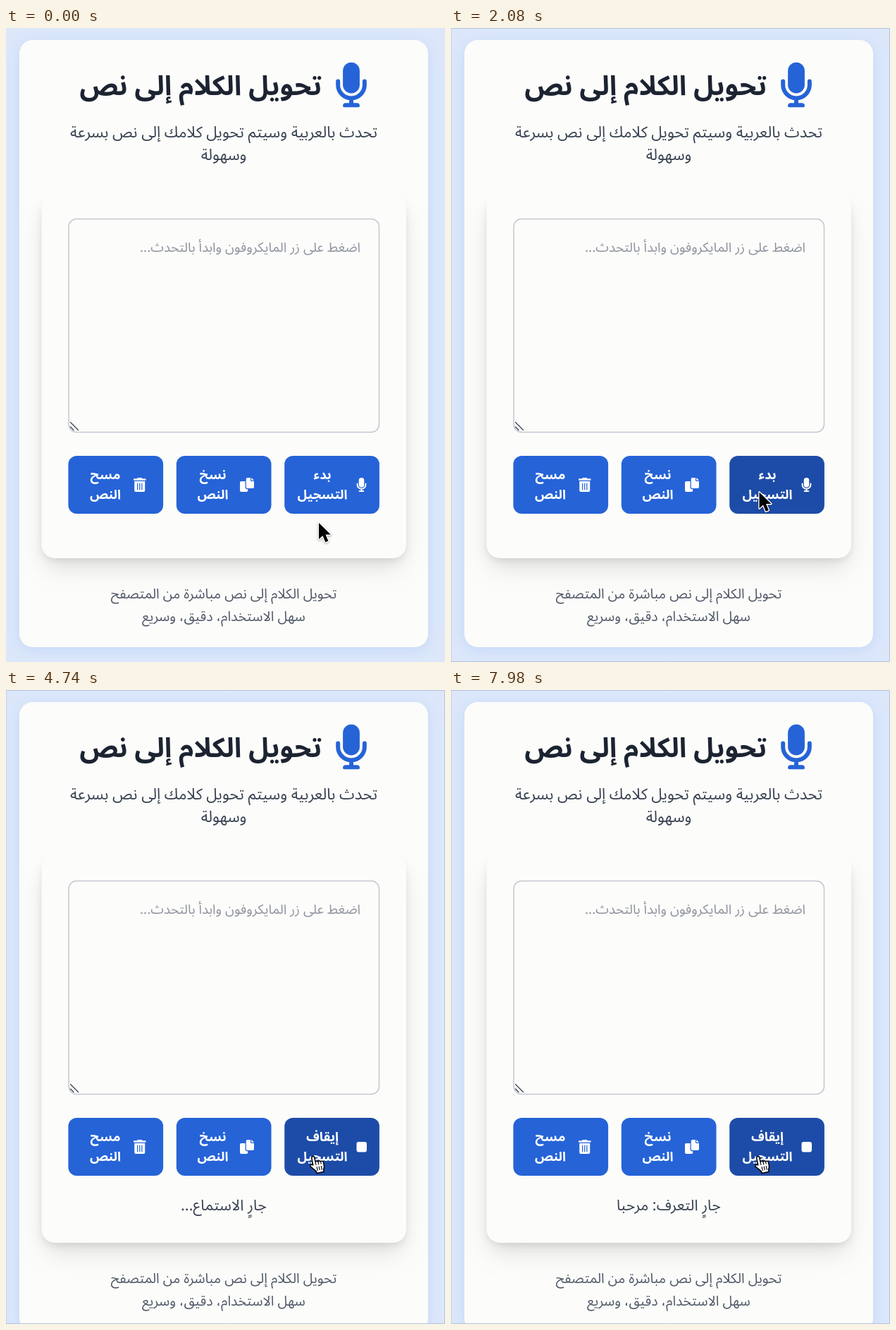
These frames come from a looping animation (623x898 px, 8 s). An HTML page with a canvas:

```html
<!DOCTYPE html>
<html lang="ar">
<head>
<meta charset="utf-8">
<title>تحويل الكلام إلى نص</title>
<style>
  html, body { margin: 0; width: 100%; height: 100%; overflow: hidden; background: #dce7fa; }
  canvas { display: block; }
</style>
</head>
<body>
<canvas id="stage" width="623" height="898"></canvas>
<script>
const W = 623, H = 898, LOOP = 8000;
const ctx = document.getElementById('stage').getContext('2d');

const PAGE = '#dce7fa', PAPER = '#fcfcfa';
const BLUE = [37, 99, 215], DARK_BLUE = [29, 76, 168];
const rgb = c => `rgb(${c.map(Math.round).join(',')})`;
const FAMILY = '"Noto Sans Arabic", "DejaVu Sans", sans-serif';
const TIMES = { edge: 40, moveStart: 120, moveEnd: 560, click: 2700, heard: 7450 };

const progress = (t, from, to) => Math.max(0, Math.min(1, (t - from) / (to - from)));
const ease = p => p * p * (3 - 2 * p);
const mix = (a, b, p) => a + (b - a) * p;

// The installed Arabic face decides the size; proportions are kept.
function style(weight, color, sample, span) {
  ctx.font = `${weight} 100px ${FAMILY}`;
  const size = Math.round(span / ctx.measureText(sample).width * 1000) / 10;
  return { font: `${weight} ${size}px ${FAMILY}`, color };
}

const LABEL = {
  title: 'تحويل الكلام إلى نص',
  intro: 'تحدث بالعربية وسيتم تحويل كلامك إلى نص بسرعة',
  hint: 'اضغط على زر المايكروفون وابدأ بالتحدث...',
  listening: 'جارٍ الاستماع...',
  footer: 'تحويل الكلام إلى نص مباشرة من المتصفح'
};

ctx.direction = 'rtl';
const STYLE = {
  title: style(700, '#1c2331', LABEL.title, 344),
  intro: style(500, '#374151', LABEL.intro, 437),
  hint: style(500, '#8e939e', LABEL.hint, 313),
  button: style(700, '#ffffff', 'التسجيل', 71),
  status: style(500, '#374151', LABEL.listening, 122),
  footer: style(500, '#505968', LABEL.footer, 320)
};

function text(str, x, y, { font, color }, align = 'center') {
  ctx.font = font;
  ctx.fillStyle = color;
  ctx.textAlign = align;
  ctx.fillText(str, x, y);
}

function box(x, y, w, h, r, fill) {
  ctx.beginPath();
  ctx.roundRect(x, y, w, h, r);
  ctx.fillStyle = fill;
  ctx.fill();
}

function shadowBox(x, y, w, h, r, color, blur, dy) {
  ctx.save();
  ctx.shadowColor = color;
  ctx.shadowBlur = blur;
  ctx.shadowOffsetY = dy;
  box(x, y, w, h, r, PAPER);
  ctx.restore();
}

function at(x, y, scale, draw) {
  ctx.save();
  ctx.translate(x, y);
  ctx.scale(scale, scale);
  draw();
  ctx.restore();
}

function stroke(path, color, width) {
  ctx.strokeStyle = color;
  ctx.lineWidth = width;
  ctx.lineCap = ctx.lineJoin = 'round';
  ctx.stroke(path);
}

const MIC_STAND = new Path2D('M40 216V256A152 152 0 0 0 344 256V216M192 408V480');
const COPY = new Path2D(
  'M384 96V0H272A48 48 0 0 0 224 48V336A48 48 0 0 0 272 384H464A48 48 0 0 0 512 336V128H416A32 32 0 0 1 384 96Z' +
  'M416 0V96H512Z' +
  'M192 352V128H48A48 48 0 0 0 0 176V464A48 48 0 0 0 48 512H240A48 48 0 0 0 288 464V416H256A64 64 0 0 1 192 352Z');
const TRASH_HANDLE = new Path2D('M128 32L140 9Q145 0 154 0H294Q303 0 308 9L320 32Z');
const SLITS = new Path2D('M144 208V432M224 208V432M304 208V432');
const ARROW = new Path2D('M0 0V17L4 13.3L6.8 20L9.8 18.7L7 12.2H12.4Z');
const HAND = new Path2D(
  'M6 14V3.5A2.2 2.2 0 0 1 10.4 3.5V10Q12.4 8.5 14.4 10.3Q16.4 9.1 18.2 10.8Q21.8 10.2 22 13.3' +
  'V18Q22 21 20 23.5V27H9V24.5Q7 21.5 2 15.5Q1.2 12.5 3.6 12.9Q5.1 13.2 6 14Z');
const KNUCKLES = new Path2D('M10.4 10V14.5M14.4 10.5V14.5M18.2 11V14.5M11 18V23M14.3 18V23M17.6 18V23');

function mic(x, y, scale, color) {
  at(x, y, scale, () => {
    box(96, 0, 192, 352, 96, color);
    stroke(MIC_STAND, color, 48);
    box(96, 464, 192, 48, [32, 32, 16, 16], color);
  });
}

function copyIcon(x, y) {
  at(x, y, 0.039, () => {
    ctx.fillStyle = '#fff';
    ctx.fill(COPY);
  });
}

function trashIcon(x, y) {
  at(x, y, 0.039, () => {
    ctx.fillStyle = '#fff';
    ctx.fill(TRASH_HANDLE);
    box(0, 32, 448, 64, 16, '#fff');
    box(32, 128, 384, 384, [0, 0, 48, 48], '#fff');
    stroke(SLITS, rgb(BLUE), 32);
  });
}

function arrow(x, y) {
  at(x, y, 1.36, () => {
    ctx.save();
    ctx.shadowColor = 'rgba(0,0,0,.35)';
    ctx.shadowBlur = 3;
    ctx.shadowOffsetY = 1;
    stroke(ARROW, '#fff', 2);
    ctx.restore();
    ctx.fillStyle = '#000';
    ctx.fill(ARROW);
  });
}

function hand(x, y) {
  at(x, y, 0.95, () => {
    ctx.rotate(-0.2);
    ctx.fillStyle = '#fff';
    ctx.fill(HAND);
    stroke(HAND, '#000', 1.6);
    stroke(KNUCKLES, '#000', 1.2);
  });
}

function textArea() {
  ctx.beginPath();
  ctx.roundRect(89, 270.5, 440.5, 302, 11);
  ctx.strokeStyle = '#c3c7d0';
  ctx.lineWidth = 1.5;
  ctx.stroke();
  stroke(new Path2D('M91.5 558.5L102.5 569.5M91.5 565L96 569.5'), '#343a48', 1.2);
  text(LABEL.hint, 503, 317, STYLE.hint, 'right');
}

function button(column, color, center, top, bottom) {
  box(88.4 + column * 153.4, 606, 134.7, 82, 12, rgb(color));
  text(top, center, 639, STYLE.button);
  text(bottom, center, 667, STYLE.button);
}

function buttons(hover, recording) {
  button(0, BLUE, 141, 'مسح', 'النص');
  trashIcon(181, 637);
  button(1, BLUE, 293.5, 'نسخ', 'النص');
  copyIcon(332, 637);
  const color = BLUE.map((c, i) => mix(c, DARK_BLUE[i], hover));
  button(2, color, 449, recording ? 'إيقاف' : 'بدء', 'التسجيل');
  if (recording) box(497.5, 640, 14.5, 14.5, 3, '#fff');
  else mic(497, 637, 0.039, '#fff');
}

function panel(grow) {
  ctx.save();
  ctx.beginPath();
  ctx.rect(19, 232, 580, H);
  ctx.clip();
  shadowBox(56, 244, 506, 501 + grow, 19, 'rgba(0,0,0,.12)', 32, 18);
  shadowBox(50.5, 232, 517.5, 519 + grow, 19, 'rgba(0,0,0,.08)', 9, 4);
  ctx.restore();

  // Fade the panel's upper edge into the surrounding card.
  const fade = ctx.createLinearGradient(0, 226, 0, 262);
  fade.addColorStop(0, PAPER);
  fade.addColorStop(1, 'rgba(252,252,250,0)');
  ctx.fillStyle = fade;
  ctx.fillRect(19, 226, 580, 36);
}

function render(t) {
  const recording = t >= TIMES.click;
  const grow = recording ? 32 : 0;
  const move = ease(progress(t, TIMES.moveStart, TIMES.moveEnd));
  const hover = progress(t, 240, 440);

  ctx.fillStyle = PAGE;
  ctx.fillRect(0, 0, W, H);
  shadowBox(19, 17, 580, 860 + grow, 19, 'rgba(110,165,240,.22)', 20, 4);

  mic(466.2, 48.8, 0.124, rgb(BLUE));
  text(LABEL.title, 448, 95, STYLE.title, 'right');
  text(LABEL.intro, 309, 155, STYLE.intro);
  text('وسهولة', 309, 187, STYLE.intro);

  panel(grow);
  textArea();
  buttons(hover, recording);
  if (recording) {
    text(t < TIMES.heard ? LABEL.listening : 'جارٍ التعرف: مرحبا', 309, 737, STYLE.status);
  }
  text(LABEL.footer, 309, 808 + grow, STYLE.footer);
  text('سهل الاستخدام، دقيق، وسريع', 309, 840 + grow, STYLE.footer);

  if (t >= TIMES.edge) {
    ctx.strokeStyle = '#b3c4dc';
    ctx.lineWidth = 1;
    ctx.strokeRect(0.5, 0.5, W - 1, H - 1);
  }

  if (recording) hand(427.5, 661);
  else arrow(mix(444, 437.5, move), mix(701, 657.5, move));
}

function tick(now) {
  render(now % LOOP);
  requestAnimationFrame(tick);
}

render(0);
requestAnimationFrame(tick);
</script>
</body>
</html>
```
